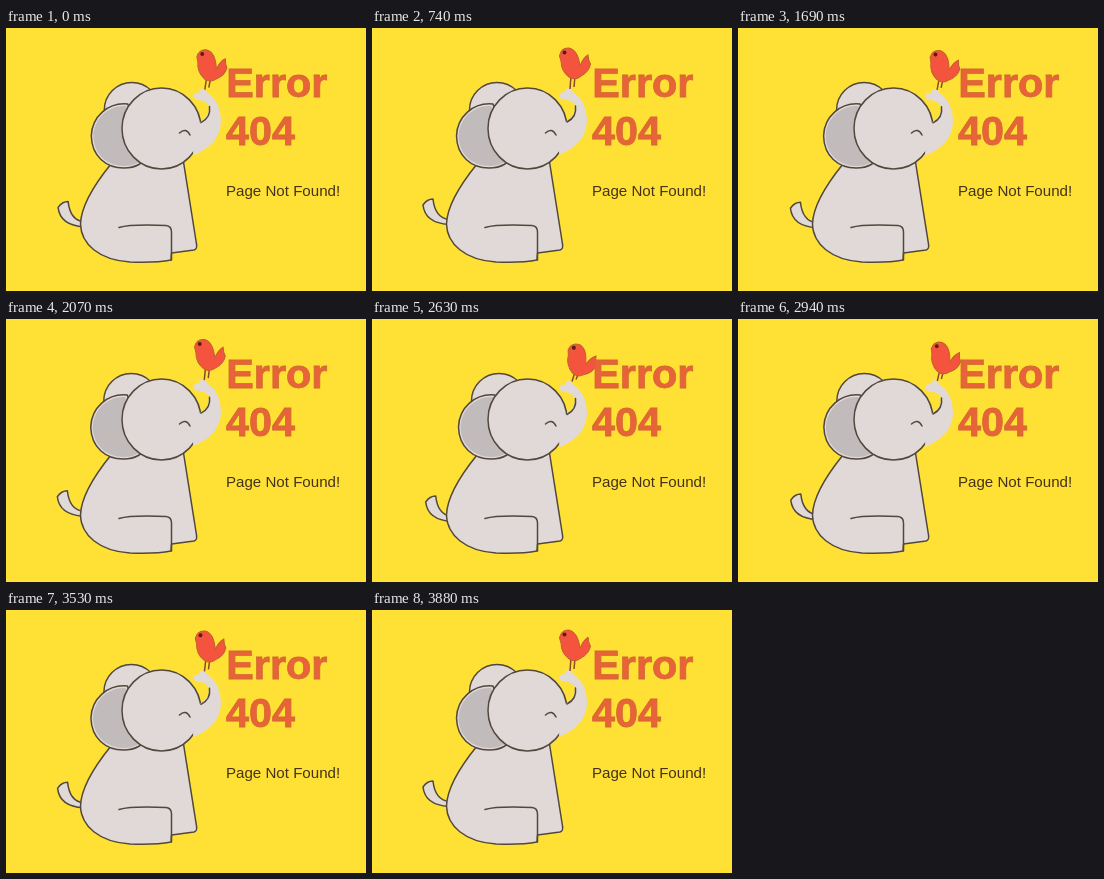
Recreate the animation shown at these times as an HTML page. Size 360 by 263 pixels, loop 3.95 s.

```html
<!DOCTYPE html>
<html lang="en">
<head>
<meta charset="utf-8">
<title>Error 404</title>
<style>
  html, body { margin: 0; height: 100%; overflow: hidden; background: #ffe135; }
  svg { display: block; width: 100vw; height: 100vh; }
  .skin { fill: #e1d9d7; stroke: #51473d; stroke-width: 1.5; stroke-linejoin: round; }
  .line { fill: none; stroke: #51473d; stroke-width: 1.5; stroke-linecap: round; }
  text { font-family: Arial, "Liberation Sans", sans-serif; }
  .title { font-size: 41.3px; font-weight: bold; fill: #e9633a; stroke: #cf6a2c; stroke-width: .8; }
</style>
</head>
<body>
<svg viewBox="0 0 360 263">
  <path id="tail" class="skin" d="M77 191.500Q63 190 61 171Q55 171 51 177Q53 195 77 196.500Z"/>
  <path class="skin" d="M105 136C92 152 75 177 74.500 196C75 216 93 232 124 234Q150 235 165 232L165.500 225L188 222Q191.500 221 190.500 216L177.500 134Z"/>
  <path class="line" d="M113 199.500Q125 196 160 197.500Q165.500 198 165.500 204V232"/>

  <g id="ears">
    <circle class="skin" cx="125" cy="82" r="27.500"/>
    <path class="skin" d="M121 76C101 74 85 89 84.500 108C85 128 99 140 117 140C130 140 138 134 139 128Z"/>
    <path fill="#c2bbbb" d="M119 78C101 77 87 91 86.500 108C87 127 101 138 117 138C129 138 136 133 137 127Z"/>
  </g>

  <ellipse class="skin" cx="155.500" cy="100.500" rx="39.500" ry="40.500"/>
  <g id="trunk">
    <path fill="#e1d9d7" d="M188 97Q204 90 203 77Q199 71 189 71Q186 66 190 64Q193 66 194 61Q198 58 202 65C211 70 215 82 215 93C214 110 205 119 187 127Z"/>
    <path class="line" d="M195 94Q205 89 203.500 78"/>
  </g>
  <path class="line" d="M173.500 105Q180 99 184 107"/>

  <path id="legs" fill="none" stroke="#8a4a25" stroke-width="1.500"/>
  <g id="bird">
    <path fill="#f4543d" stroke="#c2602c" d="M187.500 28Q189 19.500 197 20Q206 22 208 38Q211 30 216 27Q216.500 33 218.500 36Q217 44 209 48Q203 53 197 49Q189 43 189 33Z"/>
    <circle cx="192.500" cy="24.500" r="2" fill="#5a1d18"/>
  </g>

  <g class="title">
    <text x="220.300" y="68.500">Error</text>
    <text x="220" y="117">404</text>
  </g>
  <text x="220" y="168" font-size="15.100" fill="#44321a">Page Not Found!</text>
</svg>
<script>
const LOOP = 3950, HOLD = 740, REST = 0.4;
// Sway turning points: [ms, amount], 0 = leaning left, 1 = leaning right
const SWAY = [[740, 0], [1340, 0.9], [2070, 0.13], [2630, 1], [3220, 0.4], [3880, 0], [3950, 0]];

const part = id => document.getElementById(id);
const shift = (id, x, y) => part(id).setAttribute("transform", `translate(${x} ${y})`);

function swayAt(t) {
  if (t < HOLD) return REST;
  const i = SWAY.findIndex(([end]) => t < end);
  const [t0, a] = SWAY[i - 1], [t1, b] = SWAY[i];
  return a + (b - a) * (1 - Math.cos(Math.PI * (t - t0) / (t1 - t0))) / 2;
}

function draw(now) {
  const s = swayAt(now % LOOP);
  shift("tail", 2.7 * s, 6 * s);
  shift("ears", 2 * s, 0);
  shift("trunk", 0, 1.5 * s);
  part("bird").setAttribute("transform", `translate(0 ${5 * s}) rotate(${14 * s} 200 62)`);
  const hip = 199 + 4 * s, knee = 48 + 5 * s, foot = 61 + 1.5 * s;
  part("legs").setAttribute("d",
    `M${hip} ${knee}L${198 + 2 * s} ${foot}M${hip + 4} ${knee}L${202 + 2 * s} ${foot - 2}`);
  requestAnimationFrame(draw);
}
requestAnimationFrame(draw);
</script>
</body>
</html>
```
